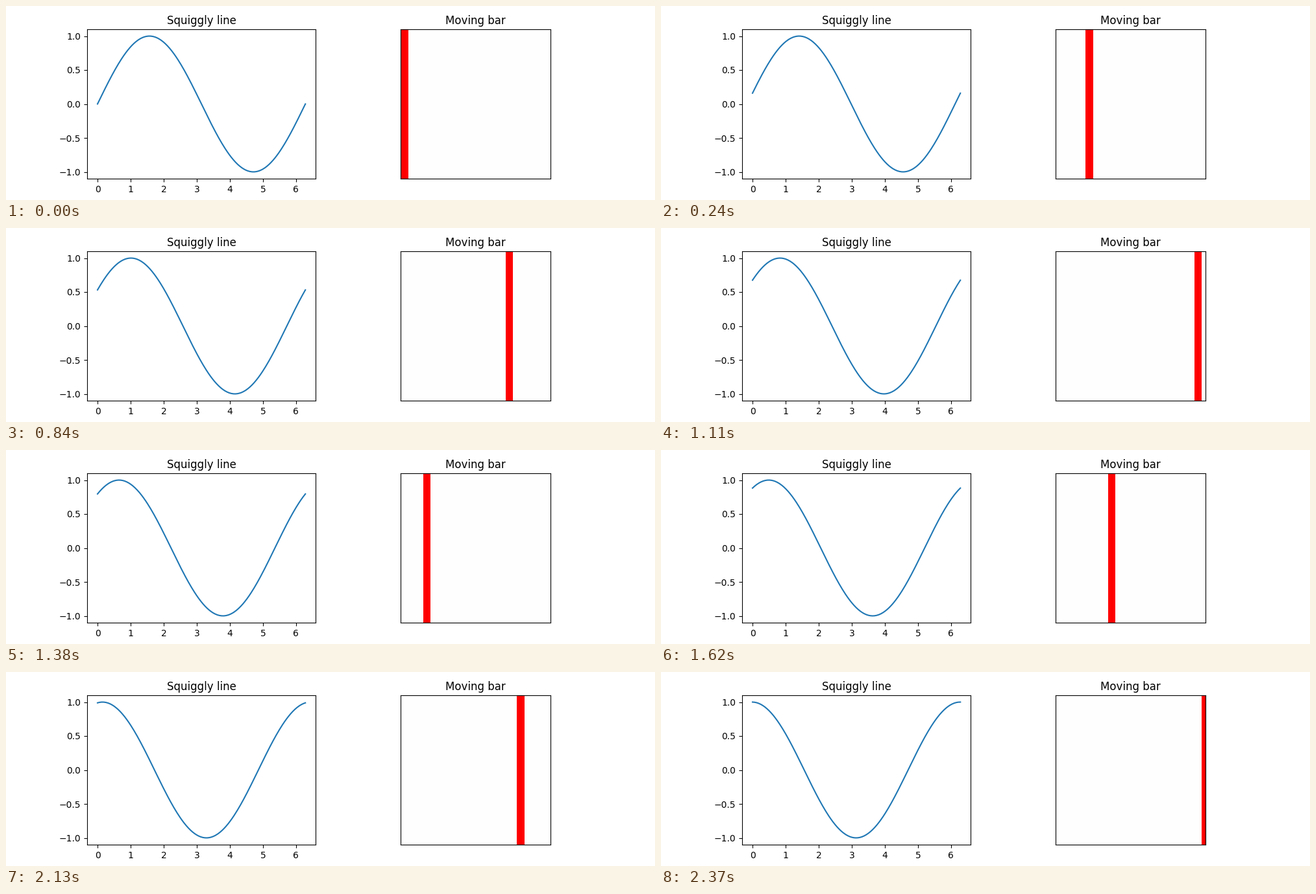
Animation, 1000 px wide and 300 px high, one loop 2.4 s. Source, as a matplotlib script:

```python
import matplotlib.pyplot as plt
import numpy as np
from matplotlib.animation import FuncAnimation
from matplotlib.colors import ListedColormap

FRAMES = 80
INTERVAL = 30      # ms
CELLS = 40
BAR_CELLS = 2
PHASE_STEP = 0.02  # radians per frame

plt.rcParams["font.family"] = "DejaVu Sans"
fig, (line_ax, bar_ax) = plt.subplots(1, 2, figsize=(10, 3), dpi=100)

x = np.linspace(0, 2 * np.pi, 200)
line, = line_ax.plot(x, np.sin(x), color="#1f77b4", linewidth=1.5)
line_ax.set_title("Squiggly line")
line_ax.set_ylim(-1.1, 1.1)


def bar_grid(start):
    grid = np.zeros((CELLS, CELLS))
    grid[:, start:start + BAR_CELLS] = 1
    return grid


image = bar_ax.imshow(bar_grid(0), cmap=ListedColormap(["#fefefe", "#ff0000"]),
                      vmin=0, vmax=1)
bar_ax.set_title("Moving bar")
bar_ax.set_xticks([])
bar_ax.set_yticks([])


def update(frame):
    line.set_ydata(np.sin(x + PHASE_STEP * frame))
    image.set_data(bar_grid(frame % CELLS))
    return line, image


anim = FuncAnimation(fig, update, frames=FRAMES, interval=INTERVAL, repeat=True)
plt.show()
```
